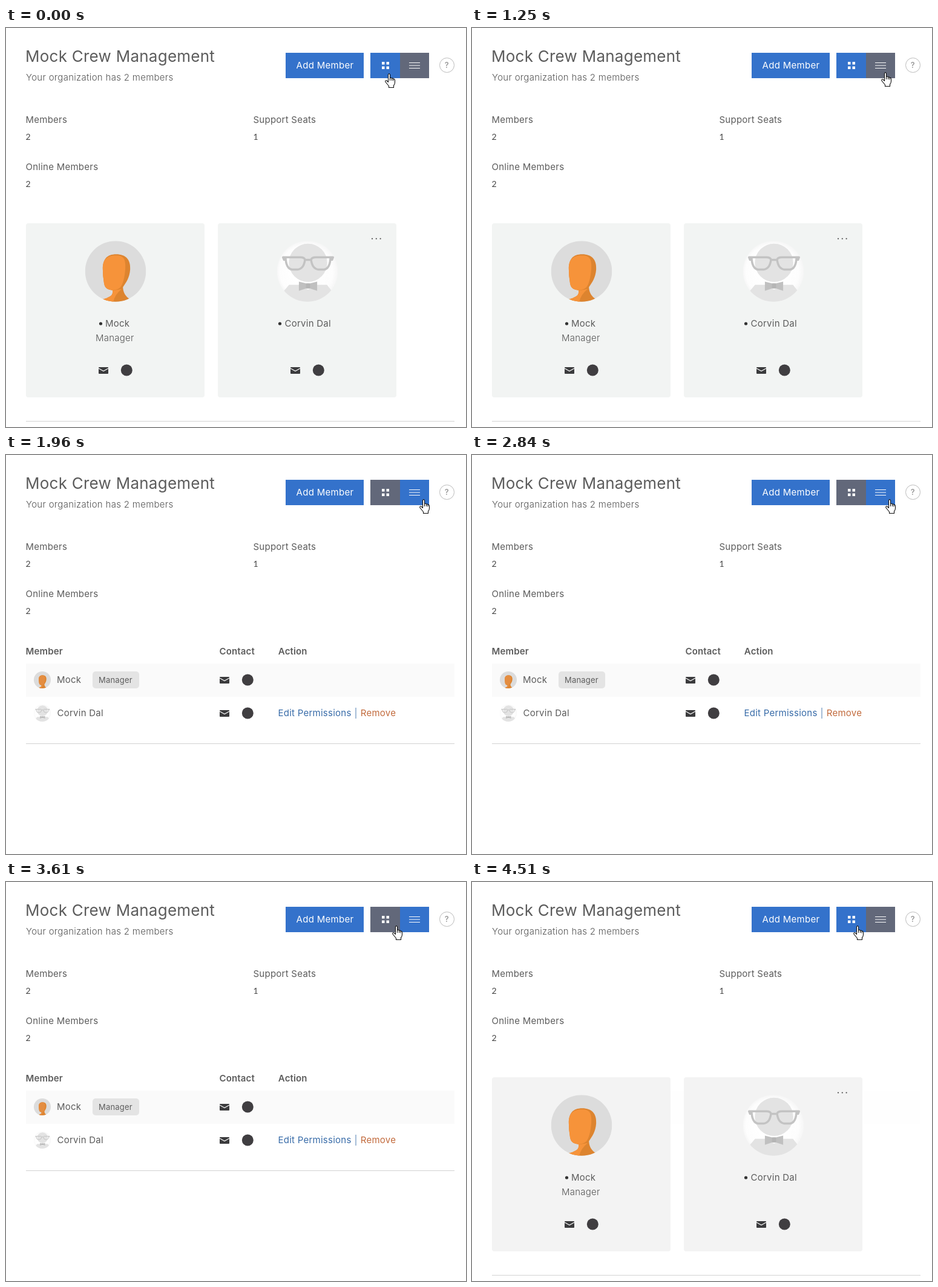
Animation of 760 by 660 pixels, one loop 4980 ms. Source, as an HTML page with a canvas:

```html
<!DOCTYPE html>
<html lang="en">
<head>
<meta charset="utf-8">
<title>Team members</title>
<style>
html, body { margin: 0; width: 100%; height: 100%; overflow: hidden; background: #fff; }
canvas { display: block; font-optical-sizing: none; }
</style>
</head>
<body>
<canvas id="stage" width="760" height="660"></canvas>
<script>
const W = 760, H = 660, LOOP = 4980, TAU = Math.PI * 2;
const BLUE = '#3472cb', SLATE = '#62687a', INK = '#5c5c5c', DARK = '#3b3b3d';
const stage = document.getElementById('stage').getContext('2d');

// Pointer path: time, left, top
const POINTER = [
  [0, 626, 75], [210, 626, 75], [690, 653, 72], [730, 654, 72], [760, 654, 72],
  [1250, 676, 73], [1270, 677, 73], [1290, 677, 73], [1370, 683, 73], [2840, 683, 73],
  [3170, 661, 72], [3310, 654, 72], [3410, 654, 72], [3610, 638, 72], [3770, 630, 72],
  [LOOP, 630, 72]
];

function rect(c, x, y, w, h, color, radius = 0) {
  c.fillStyle = color;
  c.beginPath();
  c.roundRect(x, y, w, h, radius);
  c.fill();
}

function disc(c, x, y, r, color) {
  c.fillStyle = color;
  c.beginPath();
  c.arc(x, y, r, 0, TAU);
  c.fill();
}

function text(c, str, x, y, { size = 15, weight = 400, color = INK, gap = 0.25, family = 'Inter' } = {}) {
  c.font = `${weight} ${size}px "${family}", sans-serif`;
  c.letterSpacing = gap + 'px';
  c.fillStyle = color;
  c.fillText(str, x, y);
}

function shape(c, path, color) {
  c.fillStyle = color;
  c.fill(new Path2D(path));
}

// Runs draw inside a circular clip, in coordinates centred on a radius-50 avatar
function avatar(c, x, y, r, draw) {
  c.save();
  c.translate(x, y);
  c.scale(r / 50, r / 50);
  c.beginPath();
  c.arc(0, 0, 50, 0, TAU);
  c.clip();
  draw(c);
  c.restore();
}

function orangeHead(c, light = '#f6933a') {
  const shade = '#dd842f';
  rect(c, -50, -50, 100, 100, '#dcdcdc');
  shape(c, 'M-5 27 L12 24 Q12 39 24 46 L24 51 L-24 51 L-21 46 Q-6 42 -5 36 Z', shade);
  shape(c, 'M-5 31 L10 29 Q-2 39 -4 51 L-24 51 L-21 46 Q-6 42 -5 36 Z', light);
  shape(c, 'M-21 -4 C-21 -20 -14 -28 1 -28 C17 -28 25 -19 24 -3 C23 11 17 19 12 26 Q8 31 -6 31 C-15 30 -18 26 -19 19 Q-21 7 -21 -4 Z', shade);
  shape(c, 'M-21 -4 C-21 -20 -13 -26 0 -26 C13 -26 17 -21 16 -4 C15 10 12 23 7 27 Q2 31 -6 31 C-15 30 -18 26 -19 19 Q-21 7 -21 -4 Z', light);
}

function bowTie(c) {
  const glow = c.createRadialGradient(-8, 0, 18, 0, 0, 52);
  glow.addColorStop(0, '#fff');
  glow.addColorStop(0.75, '#fdfdfd');
  glow.addColorStop(1, '#f4f4f4');
  rect(c, -50, -50, 100, 100, glow);
  shape(c, 'M-30 22 L-13 22 L1 30 L15 22 L32 22 L43 36 L30 51 L-30 51 L-42 36 Z', '#e3e3e3');
  disc(c, 1, -14, 31.5, '#e3e3e3');
  c.strokeStyle = '#c3c3c3';
  c.lineWidth = 3.5;
  c.lineJoin = 'round';
  for (const side of [-1, 1]) {
    c.save();
    c.translate(1, 0);
    c.scale(side, 1);
    c.stroke(new Path2D('M5 -19 Q6 -23 13 -23 L37 -23 Q36 -4 26 -3 L17 -3 Q7 -4 5 -19 Z M0 -19 L5 -19 M37 -23 L41 -23 L39 -18'));
    c.restore();
  }
  shape(c, 'M-14 17 L-2 20 L4 20 L16 17 L16 32 L4 28 L-2 28 L-14 32 Z', '#c0c0c0');
  rect(c, -2.5, 20, 7, 8, '#b5b5b5', 1);
}

function contactIcons(c, x, y) {
  rect(c, x, y - 5, 16, 11, DARK, 1);
  c.strokeStyle = '#f4f4f4';
  c.lineWidth = 1.4;
  c.stroke(new Path2D(`M${x} ${y - 3} L${x + 8} ${y + 1.5} L${x + 16} ${y - 3}`));
  disc(c, x + 46.3, y, 9.5, '#403e41');
}

function header(c, listActive) {
  rect(c, 0, 0, W, H, '#fff');
  text(c, 'Mock Crew Management', 32, 56, { size: 26 });
  text(c, 'Your organization has 2 members', 33, 87, { weight: 300, gap: 0.3, color: '#555' });
  rect(c, 462, 41, 129, 42, BLUE);
  text(c, 'Add Member', 479.5, 67, { color: '#fff', gap: 0.3 });

  rect(c, 602, 41, 49, 42, listActive ? SLATE : BLUE);
  rect(c, 651, 41, 48, 42, listActive ? BLUE : SLATE);
  for (const x of [621, 628.5])
    for (const y of [56, 63.5]) rect(c, x, y, 4.5, 4.5, '#fff');
  for (const y of [57, 61.5, 66]) rect(c, 666, y, 18, 1, '#fff');

  c.strokeStyle = '#bbb';
  c.lineWidth = 1;
  c.beginPath();
  c.arc(728.5, 61.5, 12, 0, TAU);
  c.stroke();
  text(c, '?', 724.8, 66, { size: 12.5, weight: 600, color: '#999', gap: 0 });

  const stat = (label, value, x, y) => {
    text(c, label, x - 0.5, y);
    text(c, value, x - 0.5, y + 28, { size: 14, family: 'Lato', gap: 0, color: '#444' });
  };
  stat('Members', '2', 33, 157);
  stat('Support Seats', '1', 409, 157);
  stat('Online Members', '2', 33, 235);
}

function cardView(c, settled) {
  header(c, false);
  if (!settled) rect(c, 33, 345, 708, 55, '#fefefe');
  const fill = settled ? '#f2f4f3' : '#f3f3f3';
  const card = (x, portrait, name, nameX, bulletX) => {
    rect(c, x, 323, 295, 288, fill, 4);
    avatar(c, x + 148, 402.5, 50.3, portrait);
    disc(c, bulletX, 489, 2.6, '#333');
    text(c, name, nameX, 494);
    contactIcons(c, x + 120, 566);
  };
  card(33, c => orangeHead(c), 'Mock', 164, 156.5);
  text(c, 'Manager', 148, 518, { weight: 300, color: '#555' });
  card(350, bowTie, 'Corvin Dal', 460.5, 452.5);
  for (const x of [605, 611.8, 618.6]) disc(c, x, 348.5, 1.1, '#444');
  rect(c, 33, 650, 708, 1, '#d2d2d2');
}

function listView(c) {
  header(c, true);
  const bold = { weight: 600, gap: 0.15 };
  text(c, 'Member', 32.5, 330, bold);
  text(c, 'Contact', 352.5, 330, bold);
  text(c, 'Action', 449.8, 330, bold);

  rect(c, 33, 345, 708, 55, '#fafafa');
  avatar(c, 60, 372, 14, c => orangeHead(c, '#e48d40'));
  text(c, 'Mock', 84, 377);
  rect(c, 143, 358, 77, 28, '#e4e4e4', 5);
  text(c, 'Manager', 153, 377, { size: 13, gap: 0.2 });
  contactIcons(c, 353, 372);

  avatar(c, 60, 427, 14, bowTie);
  text(c, 'Corvin Dal', 84.5, 432);
  contactIcons(c, 353, 427);
  text(c, 'Edit Permissions', 449.5, 432, { color: '#376ba8' });
  rect(c, 577.5, 418, 1, 18, '#4d7ab0');
  text(c, 'Remove', 585.8, 432, { color: '#c26a3c' });
  rect(c, 33, 477, 708, 1, '#d2d2d2');
}

function layer(draw) {
  const canvas = document.createElement('canvas');
  canvas.width = W;
  canvas.height = H;
  draw(canvas.getContext('2d'));
  return canvas;
}

const cards = layer(c => cardView(c, true));
const cardsReturning = layer(c => cardView(c, false));
const list = layer(listView);

function hand(c, x, y) {
  c.save();
  c.translate(x, y);
  const outline = new Path2D('M5.5 14.5 L5.5 2 Q7 -0.7 8.5 2 L8.5 8 Q10.2 6.3 11.5 8.5 Q13.2 7.2 14 9.5 Q16 8.8 16.5 11 L16.5 15 Q16.5 18 14.5 20 L14.5 23.5 L6.5 23.5 L6.5 21 Q4 18 0.8 14 Q0.3 11.2 3 12 Z');
  c.fillStyle = '#fff';
  c.fill(outline);
  c.strokeStyle = '#111';
  c.lineWidth = 1.1;
  c.lineJoin = 'round';
  c.stroke(outline);
  c.stroke(new Path2D('M8.5 8 V12 M11.5 8.5 V12 M14 9.5 V12.5'));
  c.restore();
}

function pointerAt(t) {
  const i = Math.max(1, POINTER.findIndex(p => p[0] > t));
  const [t0, x0, y0] = POINTER[i - 1], [t1, x1, y1] = POINTER[i];
  const k = (t - t0) / (t1 - t0);
  return [Math.round(x0 + (x1 - x0) * k), Math.round(y0 + (y1 - y0) * k)];
}

function listOpacity(t) {
  if (t < 1850 || t >= 4510) return 0;
  if (t < 1960) return 0.5;
  if (t < 4410) return 1;
  return t < 4460 ? 0.67 : 0.33;
}

function render(t) {
  stage.drawImage(t < 1960 ? cards : cardsReturning, 0, 0);
  stage.globalAlpha = listOpacity(t);
  stage.drawImage(list, 0, 0);
  stage.globalAlpha = 1;
  hand(stage, ...pointerAt(t));
}

const start = performance.now();
function tick() {
  render((performance.now() - start) % LOOP);
  requestAnimationFrame(tick);
}
tick();
</script>
</body>
</html>
```
